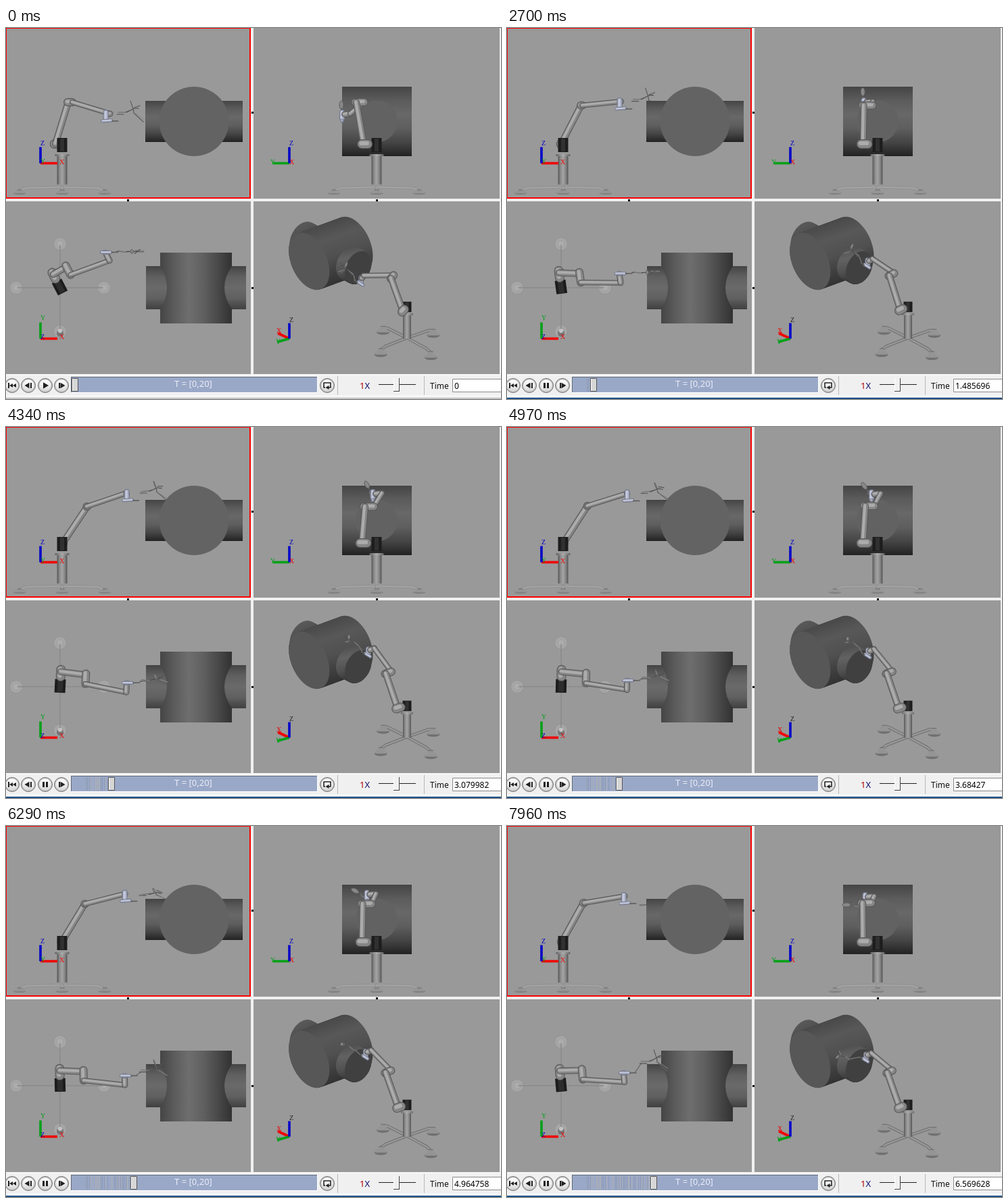
An HTML page with a canvas that plays this animation: 732x550 px, repeating every 8 s.

```html
<!DOCTYPE html>
<html>
<head>
<meta charset="utf-8">
<style>
html, body { margin: 0; width: 732px; height: 550px; overflow: hidden; background: #f0f0f0; }
canvas { display: block; }
</style>
</head>
<body>
<canvas id="stage" width="732" height="550"></canvas>
<script>
const g = document.getElementById('stage').getContext('2d');
const LOOP = 8000, UI = '"Noto Sans", "Open Sans", sans-serif';

// Each pose: ms, simulated time, base yaw, hand roll, elbow xyz, wrist xyz, hand xyz
const POSES = [
  [1990, 0.8, .48, 1.57, 9, 30, 135, 71, 39, 118, 83, 52, 117],
  [3240, 2.034252, -.09, 1.57, 38, 14, 127, 95, -14, 148, 117, 2, 149],
  [4340, 3.079982, -.05, 1.1, 37, 17, 127, 95, -8, 147, 117, 8, 147],
  [5600, 4.288558, 0, .75, 35, 19, 129, 94, -1, 146, 117, 15, 146],
  [7050, 5.708579, .05, .25, 32, 22, 130, 92, 3, 143, 115, 25, 138],
  [7960, 6.569628, .09, 0, 30, 22, 131, 91, 5, 141, 115, 32, 128]
];
// Front, side, top and oblique projections
const VIEWS = [
  ([x, y, z]) => [83 + x, 245 - z],
  ([x, y, z]) => [548 - y, 245 - z],
  ([x, y]) => [80 + 1.03 * x, 385 - 1.03 * y],
  ([x, y, z]) => [593 - .5625 * x - .617 * y, 466 - .297 * x + .227 * y - .735 * z]
];
const PANES = [[0, 0, 362, 253], [366, 0, 364, 253], [0, 257, 362, 256], [366, 257, 364, 256]];
let view, proj;

const add = (p, x, y, z) => [p[0] + x, p[1] + y, p[2] + z];

function poseAt(t) {
  if (t <= POSES[0][0]) return POSES[0];
  let i = 0;
  while (i < POSES.length - 2 && t >= POSES[i + 1][0]) i++;
  const a = POSES[i], b = POSES[i + 1], span = b[0] - a[0];
  const steps = Math.round(span / 70);
  const k = Math.min(1, Math.floor((t - a[0]) / span * steps + 1e-6) / steps);
  const e = i ? k : k * k * k * (10 - 15 * k + 6 * k * k);
  return a.map((v, j) => v + (b[j] - v) * (j < 2 ? k : e));
}

function box(x, y, w, h, fill, stroke) {
  if (fill) { g.fillStyle = fill; g.fillRect(x, y, w, h); }
  if (stroke) { g.lineWidth = 1; g.strokeStyle = stroke; g.strokeRect(x + .5, y + .5, w - 1, h - 1); }
}
function circle(x, y, r, fill, stroke, ry = r) {
  g.beginPath();
  g.ellipse(x, y, r, ry, 0, 0, 7);
  if (fill) { g.fillStyle = fill; g.fill(); }
  if (stroke) { g.lineWidth = 1; g.strokeStyle = stroke; g.stroke(); }
}
function path(points) {
  g.beginPath();
  points.forEach(p => g.lineTo(...p));
}
function line(points, color, w, cap = 'round') {
  path(points);
  g.strokeStyle = color; g.lineWidth = w; g.lineCap = cap; g.lineJoin = 'round';
  g.stroke();
}
function poly(points, fill) {
  path(points);
  g.fillStyle = fill;
  g.fill();
}
function text(s, x, y, font, fill, align = 'left') {
  g.font = font; g.fillStyle = fill; g.textAlign = align;
  g.fillText(s, x, y);
}
function ramp(x0, y0, x1, y1, ...colors) {
  const r = g.createLinearGradient(x0, y0, x1, y1);
  colors.forEach((c, i) => r.addColorStop(i / (colors.length - 1), c));
  return r;
}
const seg = (points, color, w, cap) => line(points.map(proj), color, w, cap);

function rod(p, q, w, tones = ['#555', '#868686', '#acacac']) {
  seg([p, q], tones[0], w);
  seg([p, q], tones[1], w - 2);
  g.save();
  g.translate(-w * .08, -w * .08);
  seg([p, q], tones[2], w * .4);
  g.restore();
}

// Flat disc centred at c, spanned by axis indices u and v
function disc(c, u, v, r, fill) {
  const pts = [];
  for (let i = 0; i < 48; i++) {
    const p = [...c], a = i * Math.PI / 24;
    p[u] += r * Math.cos(a);
    p[v] += r * Math.sin(a);
    pts.push(proj(p));
  }
  poly(pts, fill);
}
function tube(axis, from, to, r, fill) {
  for (let i = 0; i <= 50; i++) {
    const c = [195, 0, 107];
    c[axis] = from + (to - from) * i / 50;
    disc(c, 1 - axis, 2, r, fill);
  }
}

function vessel() {
  const shade = ['#454545', '#5c5c5c', '#686868', '#5e5e5e', '#454545', '#222'];
  if (view == 0) {
    box(206, 108, 144, 61, ramp(0, 108, 0, 169, ...shade));
    circle(278, 138.5, 51.5, '#636363');
  } else if (view == 1) {
    box(497, 87, 103, 103, ramp(0, 87, 0, 190, ...shade));
    circle(548, 138.5, 31, '#626262');
  } else if (view == 2) {
    box(228, 333, 106, 105, ramp(228, 0, 334, 0, '#454545', '#5c5c5c', '#6e6e6e', '#606060', '#494949', '#323232'));
    const side = ramp(0, 353, 0, 417, '#444', '#606060', '#6a6a6a', '#606060', '#404040');
    for (const [end, edge, mid] of [[207, 228, 248], [355, 334, 312]]) {
      g.beginPath();
      g.moveTo(end, 353); g.lineTo(edge, 353);
      g.quadraticCurveTo(mid, 385, edge, 417);
      g.lineTo(end, 417);
      g.fillStyle = side;
      g.fill();
    }
  } else {
    g.save();
    g.translate(-3, 4.5);
    tube(0, 267, 195, 33, ramp(425, 290, 450, 340, '#5a5a5a', '#3c3c3c'));
    tube(1, -52, 52, 53.5, ramp(472, 284, 505, 382, '#484848', '#585858', '#505050', '#3c3c3c', '#2c2c2c'));
    disc([195, 52, 107], 0, 2, 53.5, '#575757');
    tube(0, 146, 123, 32, ramp(505, 318, 515, 374, '#4c4c4c', '#626262', '#505050', '#303030'));
    disc([123, 0, 107], 1, 2, 32, '#404040');
    g.restore();
  }
}

function stand() {
  const oblique = view == 3;
  for (const [dx, dy] of [[1, 0], [0, 1], [-1, 0], [0, -1]]) {
    const leg = [[0, 0, 9], [dx * 52, dy * 52, 8], [dx * 61, dy * 61, 5]];
    const [x, y] = proj([dx * 63, dy * 63, 0]);
    if (view == 2) {
      circle(x, y, 9.5, '#a6a6a6', '#949494');
      circle(x, y, 5, '#adadad', '#a0a0a0');
      seg(leg, '#8b8b8b', 1.5);
      if (dy < 0) { circle(x, y + 3, 5, '#777'); circle(x, y - 1, 3, '#c4c4c4'); }
    } else {
      const low = y + (oblique ? 4 : 0);
      seg(leg, oblique ? '#6e6e6e' : '#909090', 4.5);
      seg(leg, oblique ? '#989898' : '#a2a2a2', 2.5);
      circle(x, low, 9.5, oblique ? '#707070' : '#808080', null, oblique ? 3.5 : 2);
      poly([[x - 9, low], [x - 3, y - 5], [x + 3, y - 5], [x + 9, low]], '#949494');
      line([[x - 3, y - 5], [x + 3, y - 5]], '#6a6a6a', 1);
    }
  }
  if (view == 2) return;
  const w = oblique ? 12 : 15, [x, top] = proj([0, 0, 56]), low = proj([0, 0, oblique ? 7 : 13])[1];
  box(x - w / 2, top, w, low - top, ramp(x - w / 2, 0, x + w / 2, 0, '#555', '#8c8c8c', '#a4a4a4', '#868686', '#555'));
  box(x - w / 2 - 3, top - 2, w + 6, 3, ramp(x - 10, 0, x + 10, 0, '#666', '#acacac', '#666'));
}

function black(shoulder) {
  if (view == 2) {
    const along = k => shoulder.map(v => v * k);
    seg([along(-.4), along(.5)], '#1c1c1c', 16, 'butt');
    seg([along(-.35), along(.5)], '#2d2d2d', 8, 'butt');
  } else {
    const w = view == 3 ? 13 : 15;
    seg([[0, 0, 61], [0, 0, 82]], '#1d1d1d', w, 'butt');
    seg([[0, 0, 62], [0, 0, 81]], '#303030', w * .4, 'butt');
  }
}

function hand(h, roll) {
  const c = Math.cos(roll), s = Math.sin(roll);
  // u along x, v turns from y to z, w is square to both
  const at = ([u, v, w = 0]) => add(h, u, v * c + w * s, v * s - w * c);
  const bit = (pts, color, w) => seg(pts.map(at), color, w);
  bit([[-2, 0], [8, 0]], '#555', 1.2);
  bit([[0, 3, 1], [10, 3, -1], [16, 5]], '#777', 1.6);
  bit([[12, 3], [24, 9], [30, 9, 2]], '#4c4c4c', 1.2);
  bit([[22, 9], [23, 2], [37, -11]], '#606060', 1.4);
  bit([[25, 2, 2], [38, -7, 2]], '#8a8a8a', 1);
  bit([[24, 10, -3], [32, 13, 3]], '#555', 1.2);
  const rim = [];
  for (let a = 0; a < 6.2; a += .4)
    rim.push(proj(at([20 + 2 * Math.cos(a), 14 - 6 * Math.cos(a), 3 * Math.sin(a)])));
  poly(rim, '#888');
  rim.push(rim[0]);
  line(rim, '#5f5f5f', 1);
}

function robot(pose) {
  const [, , yaw, roll] = pose;
  const sx = -Math.sin(yaw), sy = Math.cos(yaw);
  const elbow = pose.slice(4, 7), wrist = pose.slice(7, 10), grip = pose.slice(10);
  const shoulder = [sx * 21.5, sy * 21.5, 73];
  const fore = add(elbow, -sx * 13, -sy * 13, 0);
  const flange = add(wrist, sx * 13.5, sy * 13.5, -1);
  const lilac = ['#737788', '#a4a9bd', '#c3c8dc'];
  const parts = [
    () => rod(add(shoulder, -sx * 7, -sy * 7, 0), add(shoulder, sx * 3, sy * 3, 0), 14),
    () => rod(shoulder, elbow, 10),
    () => rod(add(elbow, sx * 2, sy * 2, 0), fore, 12),
    () => rod(fore, wrist, 8),
    () => rod(wrist, add(flange, -sx * 4, -sy * 4, 0), 9),
    () => {
      rod(add(flange, 0, 0, 3), add(flange, 0, 0, -6), 8, lilac);
      rod(add(flange, -5, 0, -10), add(flange, 8, 0, -9), 5, lilac);
      seg([add(flange, 9, 0, -10), add(flange, 18, 0, -10)], '#5a5a5a', 1.5);
      if (view > 1) seg([add(flange, 16, 0, -9), grip], '#707070', 1.5);
    },
    () => hand(grip, roll)
  ];
  if (view % 2) parts.reverse();
  if (view) black(shoulder);
  parts.forEach(draw => draw());
  if (!view) black(shoulder);
}

function triad() {
  const R = '#f00000', G = '#00a018', B = '#0000c8';
  // Origin, then axes (dx, dy, colour), then labels (letter, dx, dy, colour)
  const [x, y, axes, labels] = [
    [51, 200.5, [[25, 0, R], [0, -24, B]], [['Z', 0, -27, B], ['X', 28, 1, R], ['Y', 0, 0, G]]],
    [419, 200.5, [[-24, 0, G], [0, -24, B]], [['Z', 0, -27, B], ['Y', -28, 1, G], ['X', 0, 1, R]]],
    [51, 460.5, [[25, 0, R], [0, -24, G]], [['Y', 0, -28, G], ['X', 28, 0, R], ['Z', 0, 0, B]]],
    [419, 460.5, [[-17, -8, R], [-18, 5, G], [0, -23, B]], [['Z', 0, -25, '#222'], ['X', -19, -9, R], ['Y', -20, 7, G]]]
  ][view];
  for (const [dx, dy, c] of axes) line([[x, y], [x + dx, y + dy]], c, 3.6, 'butt');
  for (const [s, dx, dy, c] of labels) text(s, x + dx, y + dy, '10px "Liberation Serif", serif', c);
}

function tri(x, y, s) {
  poly([[x - s / 2, y - Math.abs(s) * .6], [x + s / 2, y], [x - s / 2, y + Math.abs(s) * .6]], '#222');
}

function toolbar(t, time) {
  box(0, 513, 732, 37, '#f0f0f0');
  box(0, 514, 732, 1, '#fafafa');
  box(0, 545, 732, 1, '#fff');
  box(0, 548, 732, 2, t < 780 ? '#c6c6c6' : '#1c5288');

  for (const x of [9, 33, 58, 82, 475]) {
    circle(x, 530, 10.5, '#c8c8c8', '#707070');
    circle(x, 530, 8.5, ramp(0, 521, 0, 539, '#fff', '#f0f0f0', '#d4d4d4'));
  }
  box(3, 526, 2, 8, '#222'); tri(7.5, 530, -5); tri(12.5, 530, -5);
  tri(31, 530, -7); box(36, 526, 2, 8, '#222');
  if (t < 1180) tri(59, 530, 8);
  else { box(54, 526, 3, 8, '#222'); box(59, 526, 3, 8, '#222'); }
  box(78, 526, 2, 8, '#222'); tri(84, 530, 7);
  line([[472, 533], [470, 533], [470, 526], [480, 526], [480, 533], [477, 533]], '#222', 1.6, 'butt');
  tri(475, 533, -5);

  const x = 101.5 + 17.6 * time;
  box(96, 517, 365, 24, '#9aa8c8');
  box(96, 517, 365, 1, '#5f6878');
  box(96, 517, 1, 24, '#5f6878');
  box(96, 540, 365, 1, '#fff');
  box(460, 517, 1, 24, '#fff');
  for (let i = 117; i < x - 5; i++) {
    const n = Math.sin(i * 91.7) * 4375 % 1;
    if (n > .1) box(i, 519, 1, 20, n > .55 ? '#aaaeb6' : '#8e9ab4');
  }
  text('T = [0,20]', 277, 532, '13px ' + UI, '#e9edf6', 'center');
  box(Math.round(x) - 5, 519, 10, 20, '#d6d6d6', '#555');
  box(Math.round(x) - 4, 520, 1, 18, '#fff');

  box(490, 516, 1, 28, '#b8b8b8');
  box(618, 516, 1, 28, '#b8b8b8');
  text('1', 523, 535, '13px ' + UI, '#b00000');
  text('X', 530.5, 535, '13px ' + UI, '#101070');
  box(551, 528, 55, 1, '#222');
  box(573, 519, 9, 20, '#f0f0f0');
  box(573, 519, 1, 20, '#fff');
  box(581, 519, 1, 20, '#444');
  box(573, 538, 9, 1, '#444');
  text('Time', 627, 535, '12px ' + UI, '#111');
  box(660, 520, 74, 20, '#fff', '#8a8a8a');
  text(String(+time.toFixed(6)), 663, 535, '12px ' + UI, '#000');
}

function render(t) {
  const pose = poseAt(t);
  const time = t < 1590 ? 0 : t < 1990 ? .4 : pose[1];
  box(0, 0, 732, 550, '#f0f0f0');
  PANES.forEach((pane, i) => {
    view = i;
    proj = VIEWS[i];
    g.save();
    g.beginPath();
    g.rect(...pane);
    g.clip();
    box(...pane, '#999');
    if (i) vessel();
    stand();
    robot(pose);
    if (!i) vessel();
    triad();
    g.restore();
  });
  g.strokeStyle = '#f00';
  g.lineWidth = 2;
  g.lineJoin = 'miter';
  g.strokeRect(0, 0, 361, 252);
  for (const [x, y] of [[363, 124], [363, 384], [179, 254], [547, 254]]) box(x, y, 3, 3, '#000');
  toolbar(t, time);
}

const start = performance.now();
function tick() {
  render((performance.now() - start) % LOOP);
  requestAnimationFrame(tick);
}
tick();
</script>
</body>
</html>
```
